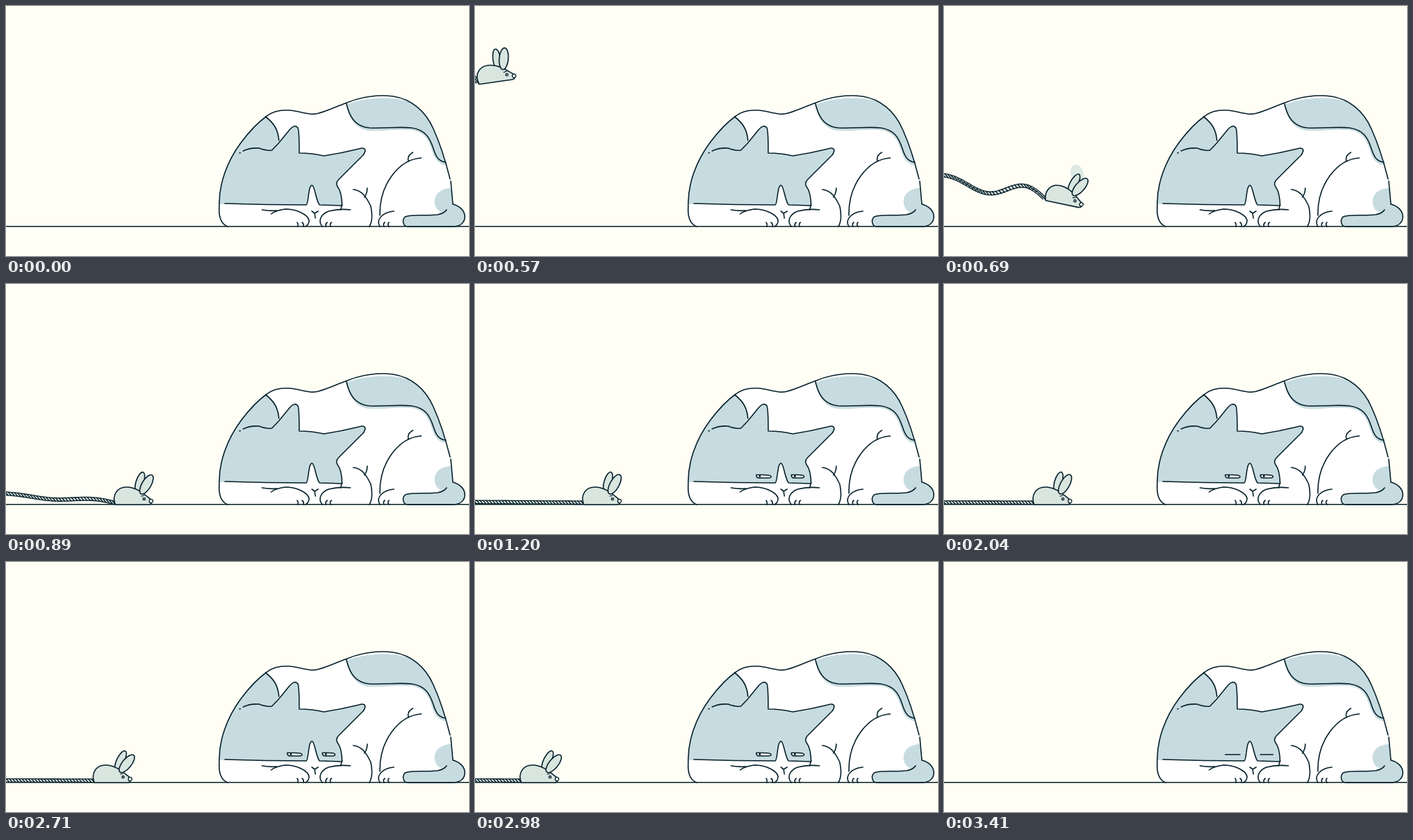
Write an HTML page that moves like this. It is 660 by 357 pixels and loops after 3470 ms.

```html
<!DOCTYPE html>
<html lang="en">
<head>
<meta charset="utf-8">
<title>Sleepy cat and toy mouse</title>
<style>
  html, body { margin: 0; width: 100%; height: 100%; overflow: hidden; background: #fffff6; }
  svg { display: block; width: 100%; height: 100%; fill: none; stroke: #06202a; stroke-width: 1.6; stroke-linecap: round; stroke-linejoin: round; }
  .grey { fill: #c7dce0; }
  .toy { fill: #d9e5df; }
  .bare { stroke: none; }
  .rope { stroke-linecap: butt; }
</style>
</head>
<body>
<svg viewBox="0 0 660 357">
  <defs>
    <path id="outline" d="M316 315C306 311 303 300 304 286C303 255 315 222 335 195C350 175 362 164 372 157C382 149 394 148 406 149C422 151 434 157 446 153C460 149 472 143 485 138.500C505 130 530 126 552 129C578 133 598 150 609 175C620 199 627 223 633 247"/>
    <clipPath id="inside"><use href="#outline"/><path d="M633 247L637 290V315H316Z"/></clipPath>
  </defs>

  <!-- cat -->
  <g clip-path="url(#inside)" class="grey bare">
    <rect x="300" y="120" width="350" height="195" fill="#fff"/>
    <path d="M485 141C490 160 497 176 518 178C540 179 560 175 578 177C597 180 602 191 607 206C611 219 617 227 630 228L624 206C614 170 600 137 552 132C528 130 505 133 485 141Z"/>
    <path d="M640 260C620 259 610 268 611 281C612 290 618 296 627 295L640 290Z"/>
    <path d="M300 283V150H362L370 158C383 168 388 178 389 192L380 206L340 283Z"/>
  </g>
  <path class="grey" d="M338 207Q348 202 361 203Q371 207 379 206Q386 199 391 193L404 177Q412 168 416 174Q418 177 418 210Q436 210 453 214Q479 210 503 204Q512 201 512 207Q511 212 506 216L474 248Q470 252 472 257Q479 266 479 285L447 284C443 280 441 264 438 258Q436 254 434 258C431 262 431 283 428 284Q370 284 312 282"/>
  <use href="#outline"/>
  <path d="M634 250L637 283"/>
  <path d="M485 138.500C489 156 496 172 518 174C540 175 560 172 578 174C598 177 604 188 609 203C613 216 617 222 627 223"/>
  <path d="M370 158C383 168 388 178 389 192M333 210L334 209.500M479 284L477 291"/>
  <path d="M436 293L440 296L445 293M440 296L441 303"/>
  <path d="M365 291Q376 293 386 292M378 297Q384 292 398 290C415 290 430 298 432 306Q432 312 427 315M416 315Q417 311 415 309M424 315Q425 311 422 309"/>
  <path d="M491 291Q475 289 460 293C449 297 444 307 451 315M456 315Q455 311 458 309M463 315Q461 311 464 309"/>
  <path d="M495 262C507 263 514 273 520 286Q524 305 518 315M515 260Q515 267 511 273"/>
  <path d="M592 217C560 219 532 255 533 299M580 209Q571 214 574 222"/>
  <path d="M553 293C539 294 526 304 533 315M539 315Q537 311 540 309M546 315Q543 311 546 309"/>
  <path class="grey" d="M637 283C648 286 654 293 654 301C654 309 648 315 637 315H573C566 315 564 306 569 301C578 297 602 300 615 298Q625 296 628 291"/>
  <path id="eyes" fill="#fff"/>
  <path id="pupils" stroke-width="2.500"/>

  <path d="M0 314.700H660"/>

  <!-- toy -->
  <g id="toy">
    <path id="rope" class="rope" stroke-width="6"/>
    <path id="core" class="rope" stroke="#e4ece5" stroke-width="3.400"/>
    <path id="twist" stroke-width="1.500"/>
    <g id="mouse">
      <ellipse id="blur" class="bare" cx="38" cy="-47" rx="9" ry="13" fill="#dde9e3" transform="rotate(-32 38 -47)"/>
      <ellipse class="toy ear" cx="36.500" cy="-32" rx="5.500" ry="15"/>
      <path class="toy" d="M2 0C-3 -13 4 -25 18 -25C33 -25 44 -14 53 -7L53 -1L50 0Z"/>
      <ellipse class="toy ear" cx="46" cy="-29" rx="6.500" ry="15.500"/>
      <path d="M39 -12L43 -13" stroke-width="1.200"/>
      <circle cx="43" cy="-8" r="1.700" fill="#9fb4b3" stroke-width="1.200"/>
      <circle cx="53" cy="-5" r="2.600" fill="#fffff6" stroke-width="1.300"/>
    </g>
  </g>
</svg>
<script>
const LOOP = 3470, THROW = 570, WAKE = 1080, TUG = 1820, PULL = 2710, GONE = 3230, ASLEEP = 3410;
const $ = id => document.getElementById(id);
const set = (id, name, value) => $(id).setAttribute(name, value);
const clamp = v => Math.max(0, Math.min(1, v));
// elapsed time since start, held for the length of a step
const held = (t, start, step) => Math.floor((t - start) / step) * step;

// The toy flies in, lands and swings to rest.
function thrown(s) {
  const height = Math.max(0, 1 - (s / 133) ** 2);
  return {
    x: 153 - 149 * Math.exp(-s / 60) * Math.cos(Math.PI * s / 360),
    y: 315 - 203 * height,
    tilt: height ? s / 6 - 8 : 0,
    ear: -16 * Math.exp(-s / 150) * Math.cos(Math.PI * s / 240),
    left: 312 - 207 * Math.exp(-s / 104),
    wave: Math.exp(-(((s - 120) / 150) ** 2))
  };
}

function drawRope({ x, y, left, wave }) {
  let path = "", twist = "";
  for (let px = x; px > -6; px -= 4.5) {
    const u = px / x;
    const sway = wave * (5 + 9 * u) * Math.sin(2 * Math.PI * (u - 0.2) / 0.8);
    const py = left + (y - 2.8 - left) * u + sway;
    path += `${path ? "L" : "M"}${px} ${py}`;
    twist += `M${px - 2} ${py - 2.3}L${px + 2} ${py + 2.3}`;
  }
  set("rope", "d", path);
  set("core", "d", path);
  set("twist", "d", twist);
}

function drawToy(t) {
  const shown = t >= THROW && t < GONE;
  $("toy").style.display = shown ? "" : "none";
  if (!shown) return;
  const s = held(t, THROW, 60);
  const toy = thrown(s);
  if (t >= TUG) {
    const p = clamp((held(t, TUG, 73) + 73) / 292);
    toy.x -= 26.5 * p * (2 - p);
    toy.ear = 8 * Math.sin(Math.PI * p);
  }
  if (t >= PULL) {
    toy.x -= 0.00057 * (held(t, PULL, 67.5) + 60) ** 2 + 0.5;
    toy.ear = 10;
  }
  set("mouse", "transform", `translate(${toy.x} ${toy.y}) rotate(${toy.tilt})`);
  document.querySelectorAll(".ear").forEach((ear, i) => {
    const lean = 16 + 13 * i;
    ear.setAttribute("transform", `rotate(${toy.ear} 36 -15) rotate(${lean} ${36.5 + 9.5 * i} ${3 * i - 32})`);
  });
  $("blur").style.display = s === 120 ? "" : "none";
  drawRope(toy);
}

// lids: open from 0 (a line) to 1, dropping towards the outer right
function eye(a, b, open) {
  const top = 275 - 2.5 * open, low = 275 + 2 * open;
  return `M${a} ${top}H${a + 9}Q${b} ${top} ${b} 275Q${b} ${low} ${b - 4} ${low}H${a + 4}Q${a} ${low} ${a} ${top}Z`;
}

function drawEyes(t) {
  const open = clamp(Math.min((t - WAKE) / 120, (ASLEEP - t) / 180));
  const awake = t >= WAKE + 60;
  set("eyes", "d", awake ? eye(401, 422, open) + eye(451, 469, open) : "");
  set("pupils", "d", awake && open ? [406, 456].map(x => `M${x} ${275 - open}v${open}`).join("") : "");
}

const start = performance.now();
function frame() {
  const t = (performance.now() - start) % LOOP;
  drawToy(t);
  drawEyes(t);
  requestAnimationFrame(frame);
}
frame();
</script>
</body>
</html>
```
